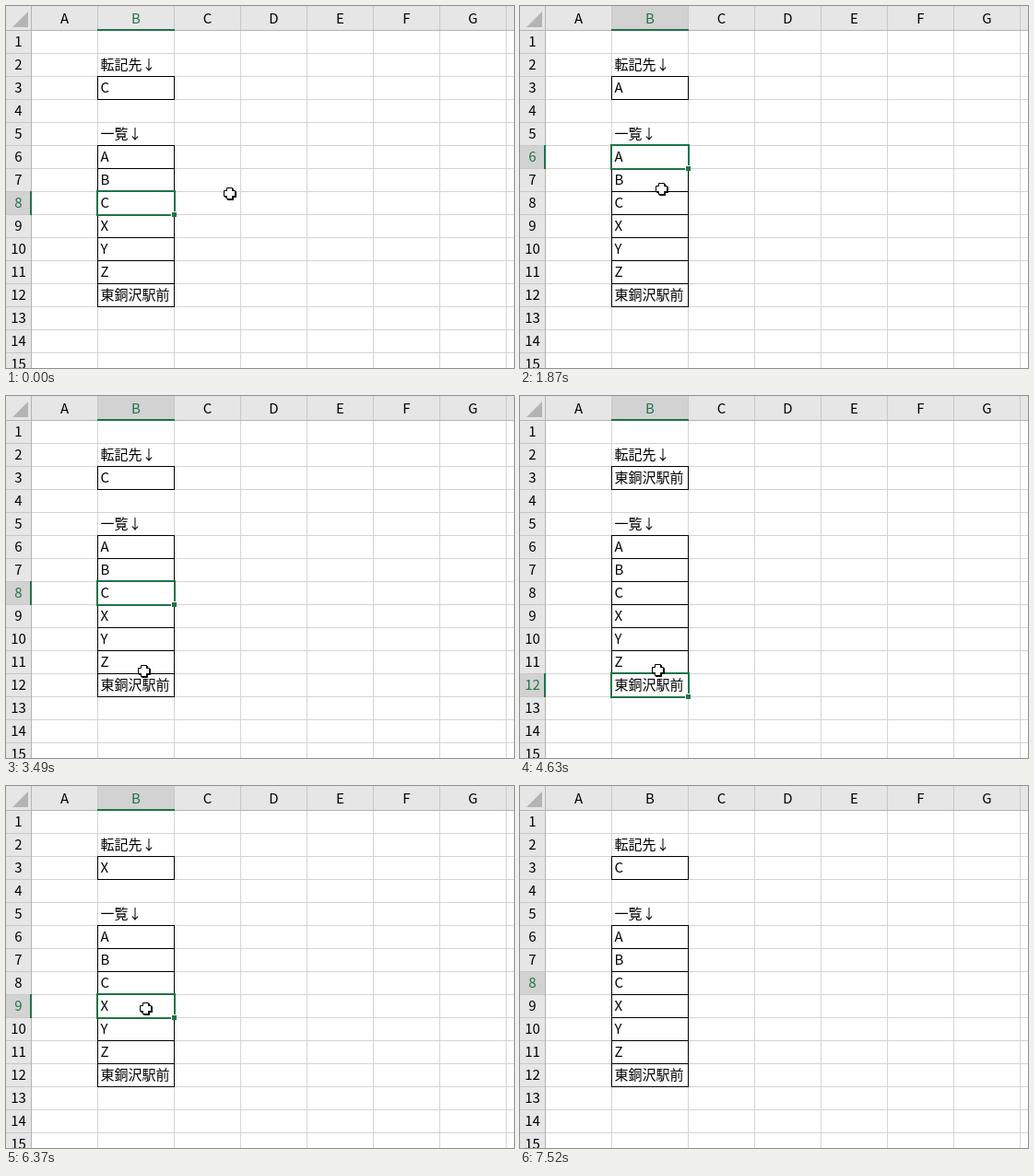
These frames come from a looping animation (551 by 393 pixels, 7620 ms). An HTML page with a canvas:

```html
<!DOCTYPE html>
<html lang="ja">
<head>
<meta charset="utf-8">
<style>
html, body { margin: 0; width: 100%; height: 100%; overflow: hidden; background: #fff; }
canvas { display: block; }
</style>
</head>
<body>
<canvas width="551" height="393"></canvas>
<script>
const ctx = document.querySelector('canvas').getContext('2d');
const LOOP = 7620, BLUR = 7520, EXIT = 7210;
const SLIDE = 240, COPY = 300, PAUSE = 120, GLIDE = 180;
const GREEN = '#217346', GRID = '#d4d4d4', HEAD = '#e6e6e6', ACTIVE = '#d2d2d2', EDGE = '#b4b4b4', SPLIT = '#c8c8c8';
const items = ['A', 'B', 'C', 'X', 'Y', 'Z', '東銅沢駅前'];

const rowTop = n => 1 + 25 * n;
const colLeft = i => i ? 110 + 72 * i - (i === 1 ? 83 : 72) : 27;
const clamp = k => Math.max(0, Math.min(1, k));
const easeOut = k => 1 - (1 - clamp(k)) ** 3;
const pullBack = k => k * k * (2.7 * k - 1.7);
const mix = (a, b, k) => a + (b - a) * k;

// Each click selects a row, then its value is copied to the top cell
const click = (time, row, x = 151, y = rowTop(row) + 15, delay = COPY) => ({ time, row, x, y, copied: time + delay });
const clicks = [
  click(-1000, 8, 242, 203),
  click(720, 6, 155, 171, 790),
  click(2050, 7, 153, 198),
  click(2830, 8),
  click(3370, 8, 149, 298), // hovers further down
  click(4150, 12, 144, 311)
];
for (let row = 11; row >= 8; row--) clicks.push(click(4150 + 600 * (12 - row), row));
const exit = { x: 510, y: 405 };

function rect(color, x, y, w, h) {
  ctx.fillStyle = color;
  ctx.fillRect(x, y, w, h);
}

function text(s, x, y, align = 'left', color = '#000') {
  ctx.font = '300 15px "Noto Sans CJK JP", "Noto Sans CJK", sans-serif';
  ctx.textAlign = align;
  ctx.fillStyle = color;
  ctx.fillText(s, x, y);
}

const cellText = (s, row) => text(s, 102.5, rowTop(row) + 18);

function boxed(s, row) {
  ctx.strokeStyle = '#000';
  ctx.lineWidth = 1;
  ctx.strokeRect(99.5, rowTop(row) + .5, 83, 25);
  cellText(s, row);
}

function drawGrid(row, t) {
  rect('#fff', 0, 0, 551, 393);
  rect(HEAD, 0, 0, 551, 26);
  rect(HEAD, 0, 0, 27, 393);
  if (t >= 60 && t < BLUR) rect(ACTIVE, 100, 0, 82, 26);
  rect(ACTIVE, 0, rowTop(row) + 1, 27, 24);

  for (let i = 0; i < 8; i++) {
    const x = colLeft(i);
    rect(SPLIT, x, 0, 1, 26);
    rect(GRID, x, 27, 1, 366);
    const color = i === 1 && t < BLUR ? GREEN : '#000';
    if (i < 7) text('ABCDEFG'[i], (x + colLeft(i + 1)) / 2 + .5, 19, 'center', color);
  }
  for (let n = 1; n <= 15; n++) {
    const y = rowTop(n);
    rect(SPLIT, 0, y, 27, 1);
    rect(GRID, 28, y, 523, 1);
    text(n, 13.5, y + 18, 'center', n === row ? GREEN : '#000');
  }
  rect(EDGE, 0, 26, 551, 1);
  rect(EDGE, 27, 0, 1, 393);
  ctx.fillStyle = EDGE;
  ctx.beginPath();
  ctx.moveTo(24, 6);
  ctx.lineTo(24, 23);
  ctx.lineTo(7, 23);
  ctx.fill();
}

function drawSelection(y) {
  rect(GREEN, 99, 25, 84, 2);
  rect(GREEN, 26, y, 2, 26);
  ctx.strokeStyle = GREEN;
  ctx.lineWidth = 2;
  ctx.strokeRect(99, y, 84, 26);
  rect('#fff', 179, y + 22, 6, 6);
  rect(GREEN, 180, y + 23, 5, 5);
}

function cross(x, y, fill) {
  ctx.beginPath();
  for (let i = 0; i < 4; i++) {
    const c = [1, 0, -1, 0][i], s = [0, 1, 0, -1][i];
    for (const [u, v] of [[3, -3], [6, -3], [6, 3]]) ctx.lineTo(x + u * c - v * s, y + u * s + v * c);
  }
  ctx.closePath();
  ctx.fillStyle = fill;
  ctx.strokeStyle = '#000';
  ctx.lineWidth = 1;
  ctx.fill();
  ctx.stroke();
}

function drawPointer(t) {
  const first = t < clicks[1].time;
  const i = first ? 0 : clicks.findLastIndex(c => c.copied + PAUSE <= t);
  // before the second departure the pointer rests on the first clicked row
  const at = clicks[first ? 0 : Math.max(1, i)];
  const to = clicks[clicks.indexOf(at) + 1] || exit;
  const k = first ? pullBack(clamp((t - 60) / 660)) : easeOut((t - at.copied - PAUSE) / GLIDE);
  const x = Math.round(mix(at.x, to.x, k)) + .5, y = Math.round(mix(at.y, to.y, k)) + .5;
  cross(x + 1, y + 1, '#000');
  cross(x, y, '#fff');
}

function draw(now) {
  const t = now % LOOP;
  const i = clicks.findLastIndex(c => c.time <= t);
  const { time, row } = clicks[i];
  const from = clicks[Math.max(0, i - 1)].row;
  const value = items[clicks.findLast(c => c.copied <= t).row - 6];

  drawGrid(row, t);
  cellText('転記先↓', 2);
  cellText('一覧↓', 5);
  boxed(value, 3);
  items.forEach((s, n) => boxed(s, 6 + n));
  if (t < BLUR) drawSelection(Math.round(rowTop(mix(from, row, easeOut((t - time) / SLIDE)))));
  if (t < EXIT) drawPointer(t);
  requestAnimationFrame(draw);
}
draw(0);
</script>
</body>
</html>
```
